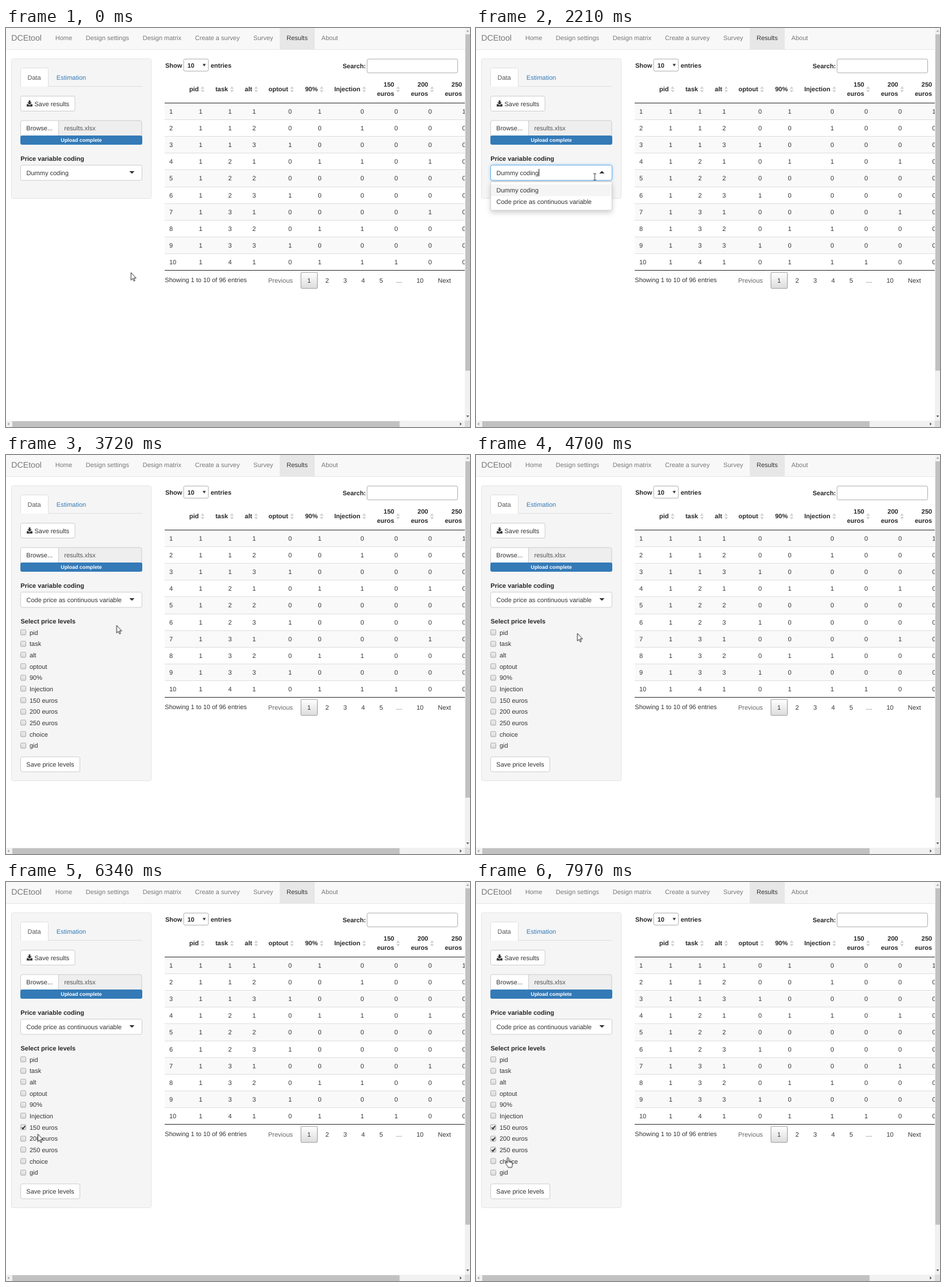
These frames come from a looping animation (807 px wide and 694 px high, 8 s). An HTML page:

```html
<!DOCTYPE html>
<html lang="en">
<head>
<meta charset="utf-8">
<title>Results</title>
<style>
html, body { margin: 0; width: 100%; height: 100%; overflow: hidden; background: #fff; }
svg { display: block; width: 807px; height: 694px; font: 11px "Liberation Sans", Arial, sans-serif; text-rendering: geometricPrecision; fill: #333; }
.b { font-weight: 700; fill: #262626; }
.m { text-anchor: middle; }
.e { text-anchor: end; }
.nav { fill: #777; }
.btn { fill: #fff; stroke: #ccc; }
.box { fill: #fff; stroke: #aaa; }
.well { fill: #f5f5f5; stroke: #e3e3e3; }
.drop { filter: drop-shadow(0 4px 4px rgba(0,0,0,.18)); }
.glow { filter: drop-shadow(0 0 2.5px rgba(102,175,233,.6)); }
.line { fill: none; stroke: #222; }
#cursor { animation: move 8s linear infinite; }
@keyframes move {
  0% { transform: translate(217px, 425px); }
  7.25% { transform: translate(217px, 425px); animation-timing-function: cubic-bezier(.4, 0, .7, .8); }
  16.5% { transform: translate(212px, 294px); }
  17.25%, 17.875% { transform: translate(211px, 289px); animation-timing-function: ease-out; }
  26% { transform: translate(206.5px, 259px); }
  32.625% { transform: translate(206.5px, 259px); animation-timing-function: ease-in-out; }
  37.375% { transform: translate(192px, 296px); }
  54.875% { transform: translate(192px, 296px); animation-timing-function: cubic-bezier(.5, 0, .8, .8); }
  64.625% { transform: translate(102px, 374px); }
  65.375% { transform: translate(92px, 385px); }
  67.5% { transform: translate(68px, 414px); animation-timing-function: ease-out; }
  70% { transform: translate(57px, 425px); }
  72%, 74.875% { transform: translate(57px, 422px); }
  79.25% { transform: translate(55px, 438px); }
  82%, 84.125% { transform: translate(54px, 443px); }
  85.5% { transform: translate(54px, 437px); }
  88.5% { transform: translate(54px, 466px); }
  90.75%, 97.625% { transform: translate(53.5px, 460px); }
  99.625%, 100% { transform: translate(55.5px, 480px); }
}
</style>
</head>
<body>
<svg viewBox="0 0 807 694">
  <defs>
    <linearGradient id="page" x2="0" y2="1"><stop stop-color="#fff"/><stop offset="1" stop-color="#dcdcdc"/></linearGradient>
    <linearGradient id="tick" x2="0" y2="1"><stop stop-color="#eee"/><stop offset="1" stop-color="#dadada"/></linearGradient>
    <clipPath id="view"><path d="M0 0H798V683H0z"/></clipPath>
  </defs>

  <path fill="#f8f8f8" d="M0 0H798V37H0z"/>
  <path fill="#e7e7e7" d="M0 37H798v1H0zM476 0h61v37h-61z"/>
  <text x="9.3" y="22" font-size="14.15" class="nav">DCEtool</text>
  <g id="nav"></g>

  <rect class="well short" x="9.5" y="53.5" width="243" height="243" rx="3"/>
  <rect class="well long" x="9.5" y="53.5" width="243" height="513" rx="3"/>

  <path stroke="#ddd" d="M25 101.5H237"/>
  <path fill="#fff" d="M25 102V72q0-3 3-3H71q3 0 3 3v30z"/>
  <path fill="none" stroke="#ddd" d="M25.500 102V72.500q0-3 3-3H70.500q3 0 3 3V102"/>
  <text x="37.500" y="90" fill="#555">Data</text>
  <text x="87.800" y="90" fill="#337ab7">Estimation</text>

  <rect class="btn" x="25.500" y="118.500" width="94.500" height="26" rx="3"/>
  <path d="M39.500 126h3v3.500h2.500l-4 4-4-4h2.500zM36 132.500h2.500l2.500 2.300 2.500-2.300H46v4H36z"/>
  <text x="49.500" y="135.500">Save results</text>

  <path fill="#eee" stroke="#ccc" d="M91.500 161H233q3 0 3 3v23.500H91.500z"/>
  <path class="btn" d="M91.500 161H28.500q-3 0-3 3v23.500h66z"/>
  <text x="35.300" y="178">Browse...</text>
  <text x="101.300" y="178" fill="#555">results.xlsx</text>
  <rect x="25" y="187" width="212" height="16" rx="3" fill="#337ab7"/>
  <text class="b m" x="131" y="198.400" font-size="8.900" style="fill:#fff">Upload complete</text>

  <text class="b" x="25.300" y="230.500">Price variable coding</text>
  <rect class="btn" x="25.500" y="238.500" width="211" height="26.500" rx="3"/>
  <path class="shut" d="M214.500 249h9l-4.500 4.500z"/>
  <text class="dummy" x="35.500" y="256">Dummy coding</text>
  <text class="coded" x="35.500" y="256">Code price as continuous variable</text>

  <g class="long">
    <text class="b" x="25.500" y="293">Select price levels</text>
    <g id="levels"></g>
    <rect class="btn" x="25.500" y="525" width="103" height="26" rx="3"/>
    <text x="35.300" y="542">Save price levels</text>
  </g>

  <g class="open">
    <rect class="glow" x="25.500" y="238.500" width="211" height="26.500" rx="3" fill="#fff" stroke="#66afe9"/>
    <path d="M214.500 253h9l-4.500-4.500z"/>
    <text x="35.500" y="256">Dummy coding</text>
    <rect class="drop" x="25.500" y="267.500" width="211" height="49.500" rx="2" fill="#fff" stroke="#d0d0d0"/>
  </g>
  <path class="first" fill="#f5f5f5" d="M26 272H236v20.500H26z"/>
  <path class="second" fill="#f5f5f5" d="M26 292.500H236V313H26z"/>
  <g class="open">
    <text x="35.500" y="286">Dummy coding</text>
    <text x="35.500" y="306">Code price as continuous variable</text>
  </g>
  <path class="caret" fill="#222" d="M109 245h1v13h-1z"/>

  <text class="b" x="277" y="68.500">Show</text>
  <rect class="box" x="309" y="54" width="43" height="21" rx="2.500"/>
  <text class="b" x="315.500" y="68.500">10</text>
  <path d="M342 62.500h5.500l-2.700 4.500z"/>
  <text class="b" x="356" y="68.500">entries</text>
  <text class="b" x="585.500" y="70">Search:</text>
  <rect class="box" x="628" y="54" width="157.500" height="24" rx="2.500"/>
  <g id="table" clip-path="url(#view)"></g>
  <path class="line" d="M276 130.500H798M276 421.500H798"/>
  <text x="276.300" y="442">Showing 1 to 10 of 96 entries</text>
  <text x="456" y="443" fill="#666">Previous</text>
  <rect x="513" y="425" width="28.500" height="28" rx="1.500" fill="url(#page)" stroke="#979797"/>
  <g id="pages"></g>
  <text x="751.300" y="443">Next</text>

  <path fill="#f1f1f1" d="M798 0h9v694H0V683H798z"/>
  <path fill="#dcdcdc" d="M798 683h9v11h-9z"/>
  <path fill="#c1c1c1" d="M799 11h8V596h-8zM11 684H684.500v10H11z"/>
  <path fill="#a3a3a3" d="M800.500 6.500h5l-2.500-3zM5.500 686v5.500l-3-2.700z"/>
  <path fill="#505050" d="M800.500 674h5l-2.500 3zM789.500 686v5.500l3-2.700z"/>

  <g id="cursor">
    <path class="arrow" transform="scale(.8)" fill="#fff" stroke="#111" stroke-width="1.200" d="M.5.5V17l3.700-3.500L6.800 19l2.300-1-2.500-5.500h5z"/>
    <g class="hand" transform="scale(.8) translate(-6.500 -1)" fill="#fff" stroke="#111" stroke-width="1.200">
      <path d="M6.500.5c1 0 1.800.7 1.800 1.700v5.500c1.300-.7 2.700-.2 3 1 1.200-.4 2.300.1 2.600 1.100 1.300-.2 2.300.5 2.300 1.800v4c0 3-1.300 3.800-1.300 6H7c-.5-2-2.700-4.300-4-6.700C2 13 .5 11.500.6 10.600c.5-1.200 2.200-.8 4.100 1.400V2.200c0-1 .8-1.700 1.800-1.700z"/>
      <path fill="none" d="M8.300 7.500V11M11.300 8.500V11.500M13.900 9.500V12"/>
    </g>
    <path class="ibeam line" d="M-2.500-5.500H-.5L0-5 .5-5.500h2M0-5V5M-2.500 5.500H-.5L0 5l.5.500h2"/>
  </g>
</svg>
<script>
const LOOP = 8000;
const $ = id => document.getElementById(id);
const text = (x, y, s, cls = '') => `<text x="${x}" y="${y}" class="${cls}">${s}</text>`;

const nav = { Home: 85.8, 'Design settings': 138.8, 'Design matrix': 237.8, 'Create a survey': 328.8, Survey: 430.3, Results: 488, About: 548.6 };
$('nav').innerHTML = Object.entries(nav)
  .map(([s, x]) => text(x, 21, s, s === 'Results' ? '' : 'nav')).join('');

const names = ['pid', 'task', 'alt', 'optout', '90%', 'Injection', '150 euros', '200 euros', '250 euros'];
const ticked = { '150 euros': 'tick150', '200 euros': 'tick200', '250 euros': 'tick250' };
$('levels').innerHTML = [...names, 'choice', 'gid'].map((s, i) => {
  const y = 308.5 + i * 19.68, top = Math.round(y - 4.5) + .5;
  const mark = ticked[s]
    ? `<path class="line ${ticked[s]}" stroke-width="1.7" d="M27.500 ${top + 4.5}l2 2.300 3.700-5"/>` : '';
  return `<rect x="25.500" y="${top - .5}" width="9" height="9" rx="1.500" fill="url(#tick)" stroke="#a8a8a8"/>`
    + mark + text(41, y + 4, s);
}).join('');

// Table: header with sort marks, then ten rows of choices
const cols = [338.5, 389.5, 431.5, 494, 545.5, 619.5, 678.5, 737.5, 796.5];
const ones = { 4: [1, 4, 8, 10], 5: [2, 4, 8, 10], 6: [10], 7: [4, 7], 8: [1] };
const cell = (row, c) => {
  const k = row - 1, alt = k % 3 + 1;
  return c < 4 ? [1, Math.floor(k / 3) + 1, alt, +(alt === 3)][c] : +ones[c].includes(row);
};
let table = names.map((s, c) => {
  const x = cols[c] - 3.3, words = s.split(' '), y = words.length > 1 ? 102 : 110;
  return words.map((w, i) => text(x, y + i * 16, w, 'b e')).join('')
    + `<path fill="#d2d2d2" d="M${x + 3.5} 105.700h6.500l-3.250-4.500zM${x + 3.5} 107.700h6.500l-3.250 4.500z"/>`;
}).join('');
for (let row = 1; row <= 10; row++) {
  const y = 131 + (row - 1) * 29.1, base = y + 18;
  if (row % 2) table += `<rect x="276" y="${y}" width="522" height="28.500" fill="#f9f9f9"/>`;
  if (row > 1) table += `<path stroke="#ddd" d="M276 ${Math.round(y) - .5}H798"/>`;
  table += text(284, base, row) + cols.map((x, c) => text(x, base, cell(row, c), 'm')).join('');
}
$('table').innerHTML = table;

const pages = [['1', 527], ['2', 558.5], ['3', 589.7], ['4', 621], ['5', 652.5], ['…', 683.5], ['10', 720]];
$('pages').innerHTML = pages.map(([s, x]) => text(x, 443, s, 'm')).join('');

// Visible spans in ms, as start and end pairs
const spans = {
  dummy: [0, 2080],
  open: [2080, 3620],
  coded: [3620, LOOP],
  shut: [0, 2080, 3620, LOOP],
  first: [2080, 2830],
  second: [2830, 3620],
  caret: [2080, 2610, 3160, 3620],
  short: [0, 3690],
  long: [3690, LOOP],
  tick150: [5740, LOOP],
  tick200: [6540, LOOP],
  tick250: [7540, LOOP],
  arrow: [0, 1800, 3700, 5420, 6270, 6390, 6800, 6870, 7920, 7955],
  hand: [1800, 2080, 2720, 3700, 5420, 6270, 6390, 6800, 6870, 7920, 7955, LOOP],
  ibeam: [2080, 2720]
};
const css = Object.entries(spans).map(([name, times]) => {
  const start = times[0] ? '0%{visibility:hidden}' : '';
  const steps = times.map((t, i) => `${t / LOOP * 100}%{visibility:${i % 2 ? 'hidden' : 'visible'}}`).join('');
  return `@keyframes ${name}{${start}${steps}}.${name}{visibility:hidden;animation:${name} ${LOOP}ms step-end infinite}`;
});
document.head.appendChild(document.createElement('style')).textContent = css.join('\n');
</script>
</body>
</html>
```
